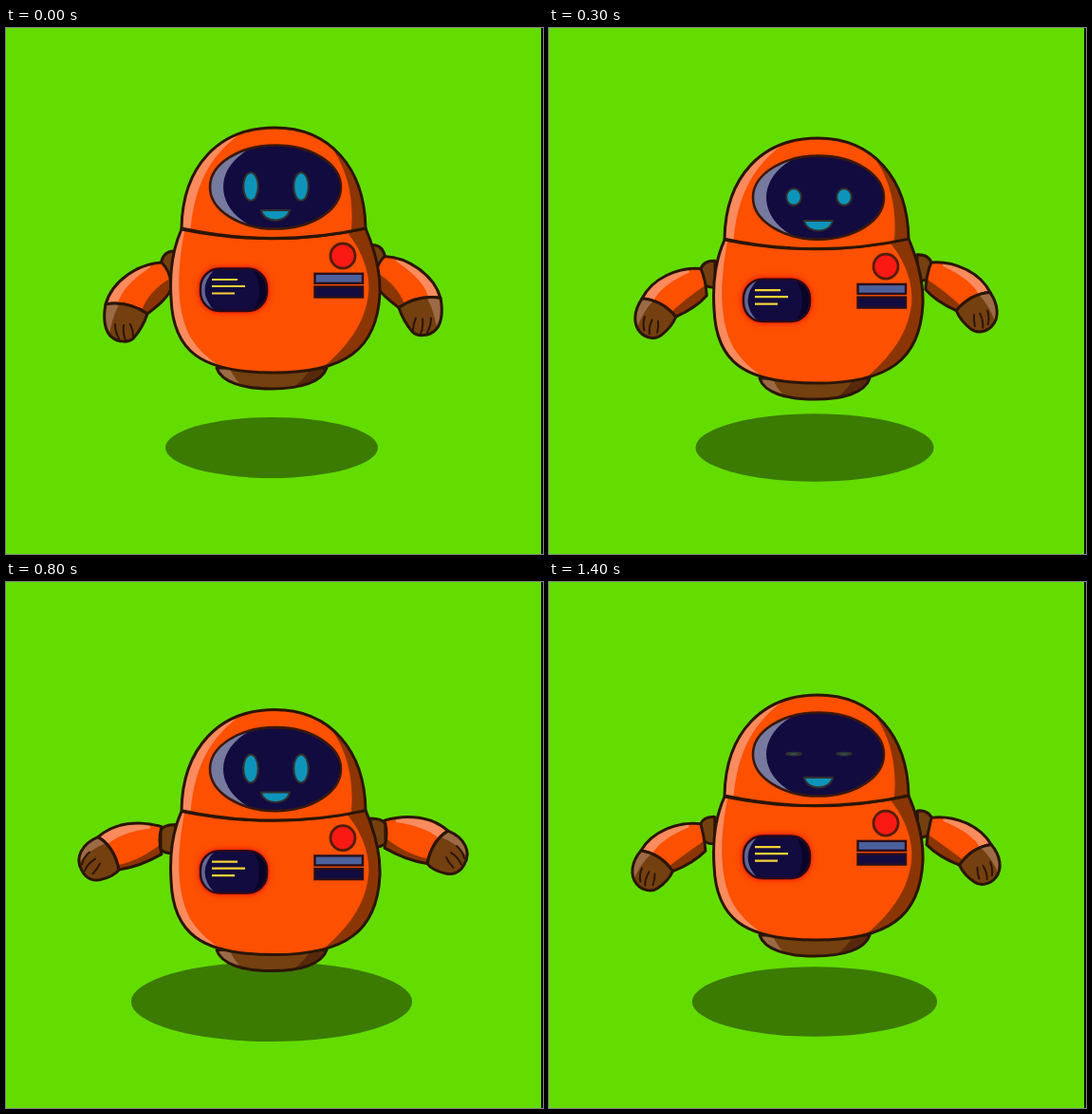
An HTML page that plays this animation: 566x554 px, repeating every 1.5 s.

```html
<!DOCTYPE html>
<html lang="en">
<head>
<meta charset="utf-8">
<title>Floating robot</title>
<style>
  html, body { margin: 0; width: 100%; height: 100%; overflow: hidden; background: #63dd00; }
  svg { display: block; width: 566px; height: 554px; }
  .line { fill: none; stroke: #2b1506; stroke-width: 3; stroke-linecap: round; stroke-linejoin: round; }
  .orange { fill: #fd5000; }
  .light { fill: #f98b5e; }
  .dark { fill: #8c3504; }
  .brown { fill: #74400f; }
  .tan { fill: #9c6a45; }
  .navy { fill: #120b40; }
  .night { fill: #080428; }
  .cyan { fill: #0e94ba; stroke: #33302f; stroke-width: 2; }
  .glow { filter: drop-shadow(0 0 2px #e81000) drop-shadow(0 0 3px #f01000); }
</style>
</head>
<body>
<svg viewBox="0 0 566 554">
  <defs>
    <path id="head" d="M185 211C186 145 225 105 283 105C342 105 378 148 379 211Q283 232 185 211Z"/>
    <path id="torso" d="M185 212C176 232 172 255 174 285C176 340 205 363 282 363C358 363 391 338 394 280C395 255 388 232 379 211Q283 232 185 212Z"/>
    <path id="base" d="M222 358C227 373 250 380 280 380C310 380 333 373 338 358Z"/>
    <ellipse id="visor" cx="284" cy="167.5" rx="69" ry="44"/>
    <rect id="panel" x="205" y="253.5" width="70" height="44.5" rx="20"/>
    <path id="joint"
      data-down="M163 250Q165 234 179 235V262Q168 262 166 252Z"
      data-up="M163 232Q166 226 179 226V256Q168 257 163 252Z"/>
    <path id="sleeve"
      data-down="M164 247C140 248 112 266 105 291Q128 287 149 301C158 294 169 286 174 275Q175 258 164 247Z"
      data-up="M164 228C140 221 114 224 97 239Q114 249 119 273.5C135 271 150 265 164 257Q160 242 164 228Z"/>
    <path id="hand"
      data-down="M105 291C102 306 104 320 112 326C118 331 130 332 135 326C141 319 146 310 149 301Q128 287 105 291Z"
      data-up="M97 239C80 246 72 261 80 274.5C85 284 94 286 101 283.5C108 282 116 278 119 273.5Q114 249 97 239Z"/>
    <clipPath id="inHead"><use href="#head"/></clipPath>
    <clipPath id="inTorso"><use href="#torso"/></clipPath>
    <clipPath id="inBase"><use href="#base"/></clipPath>
    <clipPath id="inVisor"><use href="#visor"/></clipPath>
    <clipPath id="inPanel"><use href="#panel"/></clipPath>
    <clipPath id="inSleeve"><use href="#sleeve"/></clipPath>
    <clipPath id="inHand"><use href="#hand"/></clipPath>
  </defs>

  <ellipse id="shadow" cx="280" cy="442" fill="#3b7b02"/>

  <g id="robot">
    <g id="arm">
      <use href="#joint" class="brown"/>
      <use href="#joint" class="line"/>
      <use href="#sleeve" class="orange"/>
      <g clip-path="url(#inSleeve)">
        <path class="light"
          data-down="M150 244L95 270L95 292L118 290Q122 272 152 252Z"
          data-up="M150 215L85 225L90 245L108 246Q122 234 152 230Z"/>
        <path class="dark"
          data-down="M142 300Q150 276 176 262L180 290L150 306Z"
          data-up="M110 270Q140 266 166 244L170 262L119 280Z"/>
      </g>
      <use href="#sleeve" class="line"/>
      <use href="#hand" class="brown"/>
      <path class="tan" clip-path="url(#inHand)"
        data-down="M105 288L98 330L108 330Q110 308 120 289Z"
        data-up="M97 236L68 250L74 270Q86 252 107 245Z"/>
      <use href="#hand" class="line"/>
      <path class="line" style="stroke-width:2"
        data-down="M115 312Q115 320 119 327M124 313Q123 321 126 329M131 312Q134 318 134 325"
        data-up="M88 255Q82 260 80 268M94 262Q86 267 83 274.5M99 267Q96 273 91.5 277.6"/>
    </g>
    <use href="#arm" transform="translate(563 -6.5) scale(-1 1)"/>

    <use href="#base" class="brown"/>
    <g clip-path="url(#inBase)">
      <path class="tan" d="M220 355H235Q238 368 252 380H220Z"/>
      <path fill="#57290a" d="M340 355H322Q318 368 298 382H340Z"/>
    </g>
    <use href="#base" class="line"/>

    <use href="#torso" class="orange"/>
    <g clip-path="url(#inTorso)">
      <path class="light" d="M190 205C180 250 178 295 194 325Q208 348 236 362L170 365V205Z"/>
      <path class="dark" d="M355 210C378 235 384 262 382 280C378 318 350 345 325 365H400V205Z"/>
    </g>
    <use href="#torso" class="line"/>

    <use href="#head" class="orange"/>
    <g clip-path="url(#inHead)">
      <path class="light" d="M194 220C197 170 212 137 246 112L215 100L180 150V220Z"/>
      <path class="dark" d="M333 115C358 138 369 178 363 220H385V115Z"/>
    </g>
    <use href="#head" class="line"/>

    <use href="#visor" fill="#777a9f"/>
    <g clip-path="url(#inVisor)">
      <ellipse class="navy" cx="298" cy="167.5" rx="69" ry="50"/>
      <path class="night" d="M338 120Q364 167 338 215H360V120Z"/>
    </g>
    <use href="#visor" class="line" style="stroke:#3a180c;stroke-width:2.6"/>
    <ellipse class="cyan eye" cx="258" cy="167" rx="7.8"/>
    <ellipse class="cyan eye" cx="311" cy="167" rx="7.8"/>
    <path class="cyan" d="M269 192H299C296 206 272 206 269 192Z"/>

    <circle cx="355" cy="240" r="13" fill="#fb1913" stroke="#541c0a" stroke-width="2.8"/>
    <g stroke="#2a0f1b" stroke-width="2.4">
      <rect x="325.5" y="258.8" width="50.5" height="10" fill="#4c609c"/>
      <rect x="325.5" y="272.5" width="50.5" height="11" class="navy"/>
    </g>

    <use href="#panel" class="navy glow"/>
    <g clip-path="url(#inPanel)">
      <path fill="#626891" d="M222 252Q197 276 222 300H203V252Z"/>
      <path class="night" d="M259 252Q275 276 259 300H277V252Z"/>
    </g>
    <use href="#panel" class="line" style="stroke:#2a0a1c;stroke-width:2.4"/>
    <path d="M217 265H244M217 272H252M217 279.5H241" stroke="#f5d234" stroke-width="2.2"/>
  </g>

  <rect x="564" width="2" height="554" fill="#041000"/>
</svg>
<script>
  const STEP = 100, STEPS = 15, SPEED = 3.7, LOWEST = 29.6;
  const find = selector => document.querySelectorAll(selector);
  const [robot] = find('#robot'), [shadow] = find('#shadow'), [arm] = find('#arm');
  const eyes = find('.eye'), limbs = find('[data-down]');
  const NUMBER = /[\d.]+/g;

  // Blends two paths that share the same commands.
  function blend(from, to, amount) {
    const ends = to.match(NUMBER);
    let i = 0;
    return from.replace(NUMBER, start => +start + (ends[i++] - start) * amount);
  }

  function draw(time) {
    const step = Math.floor(time / STEP) % STEPS;
    const drop = SPEED * Math.min(step, 17.8 - step);
    const lift = drop / LOWEST;
    const arc = 4 * lift * (1 - lift);
    const blink = Math.min(Math.abs(step - 4), Math.abs(step - 14));

    robot.setAttribute('transform', `translate(0 ${drop})`);
    shadow.setAttribute('rx', 112 + 1.22 * drop);
    shadow.setAttribute('ry', 32 + 0.34 * drop);
    // The arm swings on an arc, so it bows outward halfway.
    arm.setAttribute('transform', `translate(${-4.3 * arc} ${2.6 * arc})`);
    for (const limb of limbs) limb.setAttribute('d', blend(limb.dataset.down, limb.dataset.up, lift));
    for (const eye of eyes) eye.setAttribute('ry', 14.8 * Math.min(1, 0.09 + blink / 2));
    requestAnimationFrame(draw);
  }
  draw(0);
</script>
</body>
</html>
```
